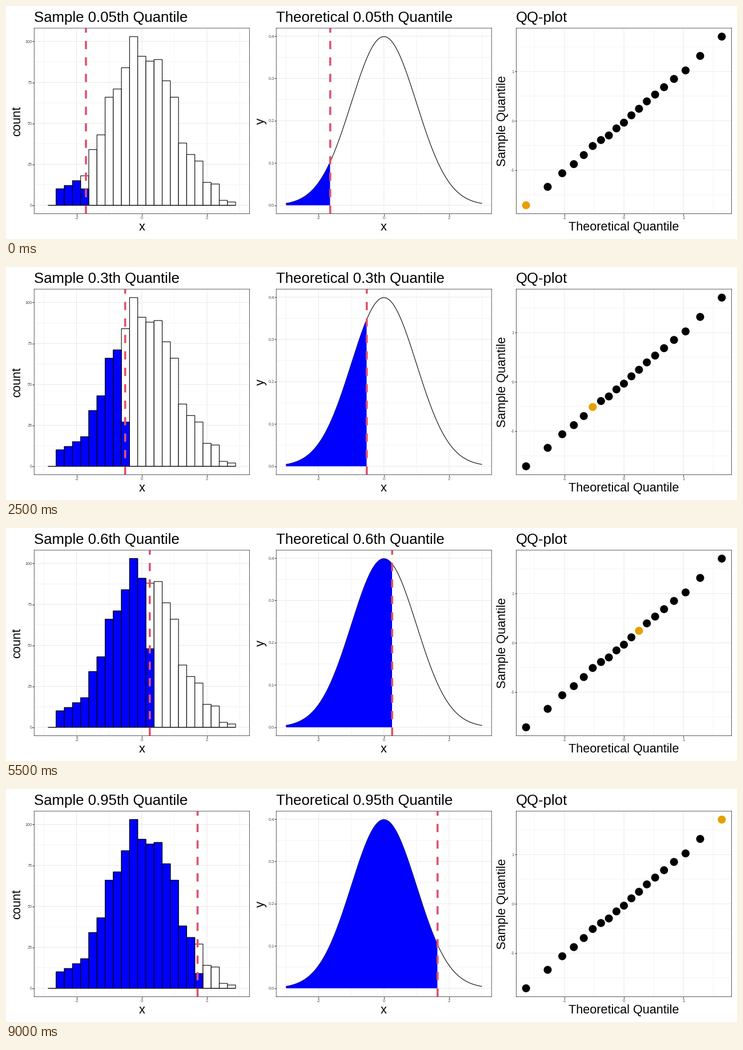
Recreate the animation shown at these times as a matplotlib script. Size 1280 by 410 pixels, loop 9.5 s.

```python
import math

import numpy as np
import matplotlib.pyplot as plt
from matplotlib.animation import FuncAnimation
from matplotlib.ticker import FixedLocator, FuncFormatter

W, H, DPI = 1280, 410, 80
PT = 72 / DPI  # points per pixel
TOP, BOTTOM, PANEL_W = 39, 365.5, 377
BLUE, RED, ORANGE = "#0000FF", "#DF536B", "#E69F00"

plt.rcParams["font.family"] = "Liberation Sans"
plt.rcParams["path.snap"] = False  # keep sub-pixel line positions
fig = plt.figure(figsize=(W / DPI, H / DPI), dpi=DPI, facecolor="white")


def label(x, y, s, size, **kw):
    return fig.text(x / W, 1 - y / H, s, fontsize=size * PT, color="black",
                    va="baseline", **kw)


def y_title(x, s):
    label(x, (TOP + BOTTOM) / 2, s, 21.6, rotation=90, ha="center",
          rotation_mode="anchor")


def panel(left, xlim, ylim, xticks, yticks, xminor, yminor, fmt):
    ax = fig.add_axes([left / W, 1 - BOTTOM / H, PANEL_W / W, (BOTTOM - TOP) / H])
    ax.set(xlim=xlim, ylim=ylim)
    for axis, major, minor in ((ax.xaxis, xticks, xminor), (ax.yaxis, yticks, yminor)):
        axis.set_major_locator(FixedLocator(major))
        axis.set_minor_locator(FixedLocator(minor))
        axis.grid(True, which="major", color="#EBEBEB", lw=1.07 * PT)
        axis.grid(True, which="minor", color="#EBEBEB", lw=0.53 * PT)
    ax.xaxis.set_major_formatter(FuncFormatter(lambda v, _: f"{v:g}"))
    ax.yaxis.set_major_formatter(FuncFormatter(lambda v, _: format(v, fmt)))
    ax.tick_params(which="major", length=2.7 * PT, width=1.07 * PT, color="#333333",
                   labelcolor="#4D4D4D", labelsize=7.4 * PT)
    ax.tick_params(axis="x", pad=1.8 * PT)
    ax.tick_params(axis="y", pad=1.0 * PT)
    ax.tick_params(which="minor", length=0)
    ax.set_axisbelow(True)
    for side in ax.spines.values():
        side.set(color="#333333", linewidth=0.8 * PT, zorder=10)
    return ax


def marker_line(ax):
    return ax.axvline(0, color=RED, lw=3.62 * PT, ls=(0, (4, 4)), zorder=6)


def density(x):
    return np.exp(-x * x / 2) / math.sqrt(2 * math.pi)


# Quantile levels with their theoretical and sample values
probs = np.arange(1, 20) * 0.05
z = np.linspace(-3, 3, 6001)
cdf = [0.5 * (1 + math.erf(v / math.sqrt(2))) for v in z]
theory = np.interp(probs, cdf, z)
sample = np.array([-1.713, -1.339, -1.063, -0.878, -0.694, -0.510, -0.389,
                   -0.296, -0.153, -0.037, 0.112, 0.245, 0.395, 0.533,
                   0.683, 0.850, 1.023, 1.317, 1.709])

# Histogram
counts = np.array([0, 10, 12, 15, 18, 34, 43, 66, 71, 84, 103, 91, 88, 89,
                   76, 66, 38, 31, 27, 14, 13, 3, 2])
below = np.cumsum(counts) - counts
edges = -2.875 + 0.25 * np.arange(len(counts))

hist = panel(49.3, (-3.3, 3.3), (-5.15, 108.15), [-2, 0, 2], range(0, 101, 25),
             [-3, -1, 1, 3], np.arange(12.5, 100, 25), "g")
bar_style = dict(width=0.25, align="edge", edgecolor="black", linewidth=1.07 * PT)
hist.bar(edges, counts, color="white", zorder=3, **bar_style)
filled = hist.bar(edges, counts, color=BLUE, zorder=4, **bar_style)
hist_line = marker_line(hist)

# Density curve
peak = float(density(0))
curve = panel(473.2, (-3.3, 3.3), (-0.05 * peak, 1.05 * peak), [-2, 0, 2],
              np.arange(5) / 10, [-3, -1, 1, 3], np.arange(4) / 10 + 0.05, ".1f")
grid = np.linspace(-3, 3, 601)
curve.plot(grid, density(grid), color="black", lw=1.07 * PT, zorder=3)
area, = curve.fill([-3, 3, 3], [0, 0, 0], color=BLUE, lw=0, zorder=4)
curve_line = marker_line(curve)

# QQ-plot
halves = [-1.5, -0.5, 0.5, 1.5]
pad = 0.05 * (sample[-1] - sample[0])
qq = panel(893.5, (1.1 * theory[0], 1.1 * theory[-1]),
           (sample[0] - pad, sample[-1] + pad),
           [-1, 0, 1], [-1, 0, 1], halves, halves, "g")
dots = qq.scatter(theory, sample, s=(14 * PT) ** 2, c="black", linewidths=0, zorder=3)

hist_title = label(49.3, 27.7, "", 25.8)
curve_title = label(473, 27.7, "", 25.8)
label(893, 27.7, "QQ-plot", 25.8)
for cx, text in ((238, "x"), (661.5, "x"), (1082, "Theoretical Quantile")):
    label(cx, 395.3, text, 21.6, ha="center")
y_title(24.7, "count")
y_title(451.5, "y")
y_title(874.7, "Sample Quantile")


def draw(i):
    p = probs[i]
    hist_title.set_text(f"Sample {p:.2g}th Quantile")
    curve_title.set_text(f"Theoretical {p:.2g}th Quantile")

    # A few observations lie outside the visible bins
    total = 1000 * p - round(2.75 + 3.6 * p)
    for bar, h in zip(filled, np.clip(total - below, 0, counts)):
        bar.set_height(h)
    hist_line.set_xdata([sample[i]] * 2)

    xs = grid[grid <= theory[i]]
    area.set_xy(np.column_stack([np.r_[xs, xs[-1], -3], np.r_[density(xs), 0, 0]]))
    curve_line.set_xdata([theory[i]] * 2)

    dots.set_facecolor([ORANGE if k == i else "black" for k in range(len(probs))])
    return ()


anim = FuncAnimation(fig, draw, frames=len(probs), interval=500,
                     repeat=True, repeat_delay=0, init_func=lambda: draw(0))
plt.show()
```
